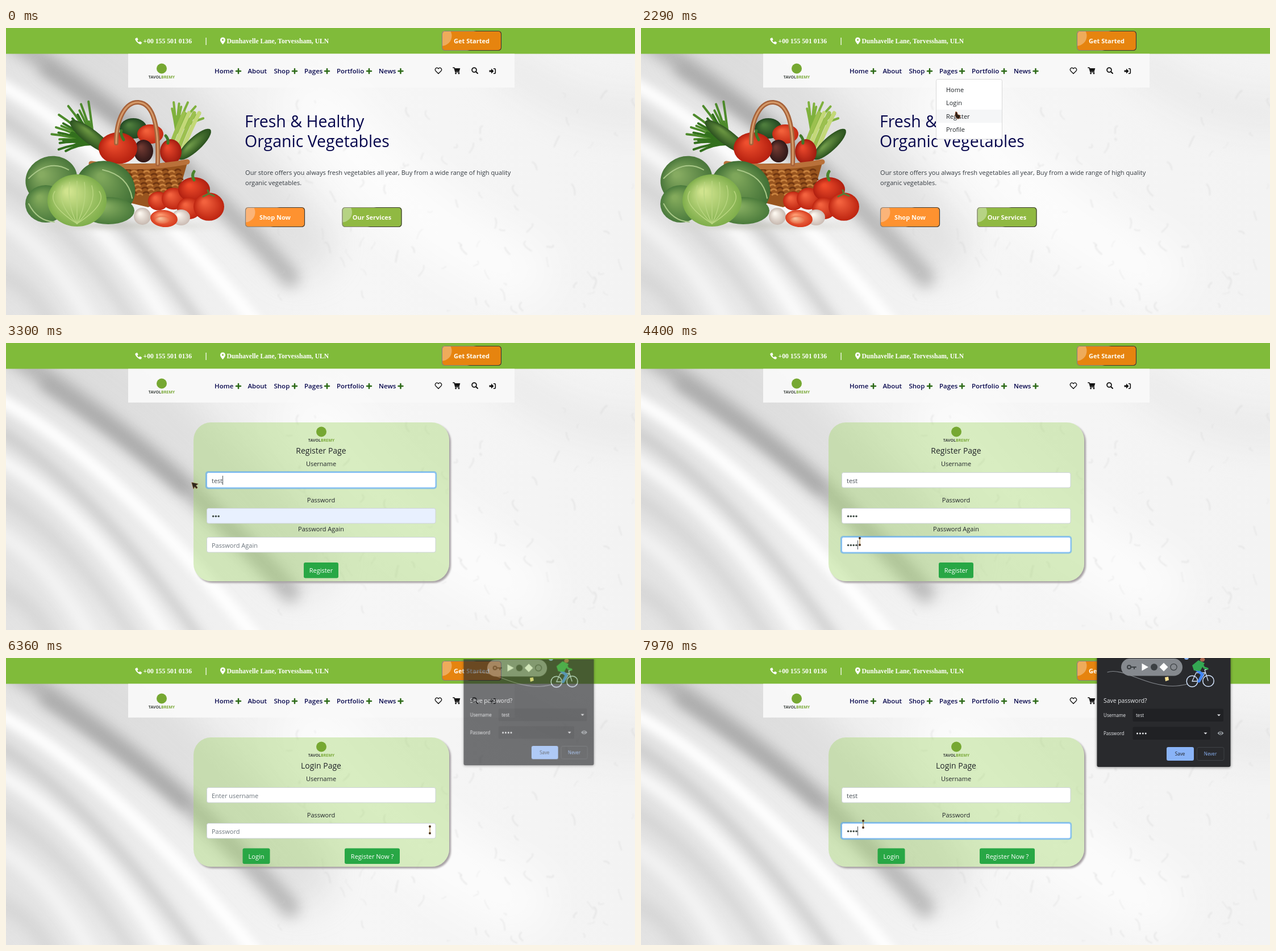
An HTML page with a canvas for the animation above (8 s loop, 1107x506 px).

```html
<!DOCTYPE html>
<html lang="en">
<head>
<meta charset="utf-8">
<title>Organic shop sign-up</title>
<style>
  html, body { margin: 0; width: 100%; height: 100%; overflow: hidden; background: #f4f4f4; }
  canvas { display: block; }
</style>
</head>
<body>
<canvas id="stage" width="1107" height="506"></canvas>
<script>
const W = 1107, H = 506, LOOP = 8000, TAU = Math.PI * 2;
const SANS = '"Open Sans", "Noto Sans", sans-serif';
const SERIF = '"Liberation Serif", serif';
const LOGIN_NAME = 'test';
const stage = document.getElementById('stage').getContext('2d');
let c = stage;

// --- helpers ---
function bake(draw) {
  const layer = document.createElement('canvas');
  layer.width = W;
  layer.height = H;
  c = layer.getContext('2d');
  draw();
  c = stage;
  return layer;
}

function text(str, x, y, size, color, weight = 400, align = 'left', family = SANS) {
  c.font = `${weight} ${size}px ${family}`;
  c.textAlign = align;
  c.fillStyle = color;
  c.fillText(str, x, y);
}

function box(x, y, w, h, r, fill, stroke, line = 1) {
  c.beginPath();
  c.roundRect(x, y, w, h, r);
  if (fill) { c.fillStyle = fill; c.fill(); }
  if (stroke) { c.strokeStyle = stroke; c.lineWidth = line; c.stroke(); }
}

function dot(x, y, r, fill) {
  c.beginPath();
  c.arc(x, y, r, 0, TAU);
  c.fillStyle = fill;
  c.fill();
}

function ring(x, y, r, color, line) {
  c.beginPath();
  c.arc(x, y, r, 0, TAU);
  c.strokeStyle = color;
  c.lineWidth = line;
  c.stroke();
}

function poly(fill, ...pts) {
  c.beginPath();
  for (let i = 0; i < pts.length; i += 2) c.lineTo(pts[i], pts[i + 1]);
  c.closePath();
  c.fillStyle = fill;
  c.fill();
}

function path(d, color, line) {
  const p = new Path2D(d);
  if (line) {
    c.strokeStyle = color;
    c.lineWidth = line;
    c.lineCap = c.lineJoin = 'round';
    c.stroke(p);
  } else {
    c.fillStyle = color;
    c.fill(p);
  }
}

function at(x, y, draw) {
  c.save();
  c.translate(x, y);
  draw();
  c.restore();
}

// --- cloth backdrop ---
function cloth() {
  const base = c.createLinearGradient(0, 0, W, 0);
  base.addColorStop(0, '#e3e3e3');
  base.addColorStop(0.3, '#efefef');
  base.addColorStop(0.55, '#f6f6f6');
  base.addColorStop(1, '#f3f3f3');
  c.fillStyle = base;
  c.fillRect(0, 0, W, H);

  const fold = (d, shade, alpha, width, blur) => {
    c.filter = `blur(${blur}px)`;
    path(d, `rgba(${shade},${shade},${shade},${alpha})`, width);
  };
  fold('M120 20 Q300 130 520 380', 205, 0.45, 110, 30);
  fold('M10 20 Q210 150 330 265 T500 440', 150, 0.6, 34, 12);
  fold('M70 75 Q200 160 310 255', 140, 0.4, 22, 10);
  fold('M-20 95 Q180 200 440 520', 255, 0.95, 24, 8);
  fold('M-20 150 Q150 250 340 520', 190, 0.6, 20, 9);
  fold('M-20 200 Q140 290 285 520', 255, 0.8, 22, 9);
  fold('M-20 265 Q110 340 225 520', 195, 0.5, 22, 11);
  fold('M-20 330 Q80 390 150 520', 255, 0.6, 24, 11);
  fold('M-20 430 Q40 450 80 520', 200, 0.5, 28, 12);
  fold('M880 60 Q1000 160 1130 150', 226, 0.5, 60, 28);
  fold('M540 130 Q700 340 900 430', 255, 0.7, 120, 40);

  // faint cracks
  let seed = 7;
  const rnd = () => (seed = seed * 16807 % 2147483647) / 2147483647;
  c.filter = 'blur(1.2px)';
  for (let i = 0; i < 90; i++) {
    const x = 480 + rnd() * 627, y = 110 + rnd() * 390;
    path(`M${x} ${y} q${rnd() * 16 - 8} ${rnd() * 9} ${rnd() * 22 - 11} ${rnd() * 20}`,
      'rgba(205,205,205,.3)', 1 + rnd() * 2);
  }
  c.filter = 'none';
}

// --- header ---
function shinyButton(x, y, label, fill, shine) {
  const w = 105, h = 35;
  box(x, y, w, h, 5, fill);
  c.save();
  c.clip();
  dot(x, y + 9, 17.5, shine);
  c.restore();
  const edge = c.createLinearGradient(x, y, x + w, y + h);
  edge.addColorStop(0, '#85807a');
  edge.addColorStop(0.48, '#85807a');
  edge.addColorStop(0.52, '#3c3a35');
  edge.addColorStop(1, '#3c3a35');
  box(x + 0.5, y + 0.5, w - 1, h - 1, 5, null, edge, 1.2);
  text(label, x + w / 2, y + 22, 11, '#fffdf5', 700, 'center');
}

function logo(x, y) {
  dot(x, y - 17, 9, '#76a832');
  c.font = `700 7px ${SANS}`;
  const left = x - c.measureText('TAVOLBREMY').width / 2;
  const mid = left + c.measureText('TAVOL').width;
  text('TAVOL', left, y, 7, '#3f4540', 700);
  text('BREMY', mid, y, 7, '#7ba93a', 700);
}

function header() {
  c.fillStyle = '#80bb3a';
  c.fillRect(0, 0, W, 45.5);
  at(227, 17, () => path('M1.2 1 L4 0 L5.6 3.5 L4 5.2 Q5 7.2 7 8.2 L8.7 6.6 L12 8.2 L11.2 11 Q9.8 12 7.5 11 Q1.8 8.2 .2 2.6 Z', '#fff'));
  text('+00 155 501 0136', 241.5, 27, 11.7, '#fff', 700, 'left', SERIF);
  c.fillStyle = '#fff';
  c.fillRect(351.5, 17, 1.2, 13);
  path('M381.5 29 C377 23.5 377 22.5 377 21 A4.5 4.5 0 0 1 386 21 C386 22.5 386 23.5 381.5 29 Z', '#fff');
  dot(381.5, 21, 1.6, '#80bb3a');
  text('Dunhavelle Lane, Torvessham, ULN', 388.5, 27, 11.6, '#fff', 700, 'left', SERIF);
  shinyButton(767, 5, 'Get Started', '#e6840f', '#eeab5b');

  c.fillStyle = 'rgba(249,249,249,.95)';
  c.fillRect(215, 45.5, 680, 59.5);
  logo(274, 88.5);
  const links = [['Home', 367, 409], ['About', 425.5], ['Shop', 471.5, 508], ['Pages', 525, 565],
    ['Portfolio', 582, 639], ['News', 656, 694.5]];
  for (const [label, x, plus] of links) {
    text(label, x, 80, 11.5, '#07074d', 600);
    if (plus) path(`M${plus - 4} 76 h8 M${plus} 72 v8`, '#2c6a17', 2.5);
  }
  path('M761 80.5 L756.3 75.8 C753.5 72.5 758 67.5 761 71.8 C764 67.5 768.5 72.5 765.7 75.8 Z', '#111', 1.3);
  at(786, 69, () => {
    path('M0.8 1 H3 L5 8.5 H11.5', '#111', 1.5);
    poly('#111', 3, 2, 13.3, 2, 11.8, 7.6, 4.4, 7.6);
    dot(5.6, 11, 1.4, '#111');
    dot(11, 11, 1.4, '#111');
  });
  ring(824, 74, 3.9, '#111', 1.8);
  path('M827 77 L830 80', '#111', 2);
  poly('#111', 850.5, 74.5, 854, 74.5, 854, 71.5, 858.5, 76, 854, 80.5, 854, 77.5, 850.5, 77.5);
  path('M858.5 71.8 H860 Q861.3 71.8 861.3 73 V79 Q861.3 80.2 860 80.2 H858.5', '#111', 1.6);
}

// --- produce basket in flat shapes ---
function blob(x, y, rx, ry, light, dark, turn = 0) {
  at(x, y, () => {
    c.rotate(turn);
    c.scale(rx, ry);
    const g = c.createRadialGradient(-0.3, -0.35, 0.1, 0, 0, 1);
    g.addColorStop(0, light);
    g.addColorStop(1, dark);
    dot(0, 0, 1, g);
  });
}

function sprig(x, y, reach, from, to, color) {
  for (let i = 0; i <= 14; i++) {
    const a = from + (to - from) * i / 14, r = reach * (0.75 + 0.25 * Math.sin(i * 2.3));
    path(`M${x} ${y} q${Math.cos(a) * r * 0.5} ${Math.sin(a) * r * 0.5 - 6} ${Math.cos(a) * r} ${Math.sin(a) * r}`, color, 4);
  }
}

function basket() {
  c.filter = 'blur(5px)';
  blob(220, 349, 155, 7, '#bcbcb4', 'rgba(220,220,215,.4)');
  c.filter = 'none';
  sprig(155, 205, 82, -3.0, -1.7, '#4d8a2b');
  sprig(150, 205, 62, -3.4, -2.0, '#33701d');
  blob(150, 192, 46, 13, '#67923f', '#2c5220', 0.65);
  sprig(300, 185, 58, -1.75, -0.5, '#7fb13d');
  for (let i = 0; i < 4; i++) path(`M${288 + i * 8} 212 Q${300 + i * 8} 180 ${313 + i * 9} 150`, i % 2 ? '#c3d878' : '#9cc04f', 7);
  blob(332, 205, 38, 12, '#6d9847', '#29501d', -0.75);
  blob(224, 177, 24, 18, '#4d7c3c', '#1f4520');
  blob(254, 187, 23, 17, '#f2603a', '#c42a14');
  blob(242, 217, 17, 20, '#713a32', '#2f1717');
  blob(197, 212, 34, 28, '#ef4f2e', '#b5200f');
  blob(290, 218, 19, 22, '#e9472b', '#9f1b0f');
  path('M207 197 q-6 -10 -4 -16 M285 203 q1 -8 -4 -13', '#3f7828', 5);
  poly('#99551f', 150, 240, 319, 238, 302, 298, 250, 316, 176, 298);
  for (let r = 0; r < 6; r++) {
    for (let i = 0; i < 13; i++) {
      const x = 166 + r * 2 + i * 11;
      path(`M${x} ${251 + r * 8 + (i % 2) * 3} q5 -4 9 0`, i % 2 ? '#c8823f' : '#703611', 3);
    }
  }
  path('M150 239 Q235 252 319 236', '#b9713a', 9);
  path('M194 203 C194 160 210 130 233 131 C262 133 269 180 267 240', '#a6623a', 8);
  path('M194 203 C194 160 210 130 233 131 C262 133 269 180 267 240', '#d59a69', 3);

  blob(80, 268, 46, 42, '#86ab61', '#49763a', -0.3);
  blob(175, 283, 53, 48, '#7ea65a', '#406f35', 0.4);
  blob(70, 310, 36, 33, '#83aa5b', '#4a7a3d');
  blob(180, 322, 46, 24, '#8ab163', '#4a7a3b');
  blob(125, 304, 52, 46, '#cfe38d', '#7fae4b');
  for (let i = -3; i <= 3; i++) path(`M125 345 Q${125 + i * 18} 310 ${125 + i * 13} ${270 + i * i * 2}`, '#b9d680', 1.4);
  path('M40 265 Q75 230 110 250 M170 250 Q215 260 222 300 M40 310 Q55 340 85 342', '#a9c888', 2);

  const tomato = (x, y, r) => blob(x, y, r, r * 0.92, '#f3623e', '#bd2410');
  tomato(268, 305, 18);
  tomato(295, 301, 21);
  blob(331, 285, 28, 22, '#ee4b2a', '#b01f10');
  path('M331 268 q-5 -8 0 -15', '#4a842c', 5);
  tomato(322, 318, 21);
  tomato(357, 315, 27);
  path('M347 297 l10 -5 l9 4 M357 292 l-2 -6', '#557f36', 3);
  blob(240, 332, 15, 15, '#fcf7ef', '#c7b9b0');
  blob(308, 334, 16, 14, '#fcf7ef', '#cbbbb3');
  blob(278, 336, 24, 15, '#ff9a70', '#d7391b', 0.1);
  blob(275, 338, 13, 7, '#f7c09a', '#e96a44');
}

// --- pages ---
function home() {
  cloth();
  header();
  basket();
  text('Fresh & Healthy', 420, 175, 28.5, '#07074d', 500);
  text('Organic Vegetables', 420, 210, 28.5, '#07074d', 500);
  text('Our store offers you always fresh vegetables all year, Buy from a wide range of high quality', 421, 259, 11.08, '#343a40');
  text('organic vegetables.', 421, 276.5, 11.08, '#343a40');
  shinyButton(421, 316, 'Shop Now', '#fe9230', '#fbb479');
  shinyButton(591.5, 316, 'Our Services', '#90b942', '#b6d384');
}

function form(title, height) {
  cloth();
  header();
  const card = new Path2D();
  card.roundRect(330, 140, 450, height, 31);
  c.save();
  const outside = new Path2D(card);
  outside.rect(0, 0, W, H);
  c.clip(outside, 'evenodd');
  c.filter = 'blur(1.5px)';
  at(3, 3, () => { c.fillStyle = '#a8a2a5'; c.fill(card); });
  c.restore();
  c.fillStyle = 'rgba(160,212,104,.4)';
  c.fill(card);
  logo(555, 173.5);
  text(title, 554.5, 195, 14, '#212529', 500, 'center');
  text('Username', 554.5, 217, 11, '#212529', 400, 'center');
  text('Password', 554.5, 280.5, 11, '#212529', 400, 'center');
}

function button(x, y, w, label, lit) {
  if (lit === 2) box(x - 2, y - 2, w + 4, 31.5, 5, 'rgba(72,180,97,.5)');
  box(x, y, w, 27.5, 3, lit ? '#218838' : '#28a745');
  text(label, x + w / 2, y + 18, 11, '#fff', 400, 'center');
}

const ROWS = { name: 228, pass: 291, again: 342 };

function field(row, hint, { value = '', dots = 0, focus, auto } = {}) {
  const y = ROWS[row];
  if (focus) box(350.8, y - 2, 407.4, 31.5, 5, 'rgba(80,165,255,.55)');
  box(353.5, y + 0.5, 402.5, 26.5, 3, auto ? '#e8f0fe' : '#fff', focus ? '#80bdff' : '#ced4da');
  let end = 362;
  if (dots) {
    for (let i = 0; i < dots; i++) dot(364.6 + i * 4.8, y + 14.5, 1.75, '#44504a');
    end += dots * 4.8;
  } else {
    text(value || hint, 362, y + 18.5, 11, value ? '#495057' : '#6c757d');
    if (value) end += c.measureText(value).width;
  }
  if (focus) {
    c.fillStyle = '#495057';
    c.fillRect(Math.round(end), y + 6, 1, 16);
  }
}

function menu(y) {
  box(519.5, 90.5, 116, 105.5, 3, '#fff', '#d9d9d9');
  ['Home', 'Login', 'Register', 'Profile'].forEach((label, i) => {
    const top = 97 + i * 23.4;
    if (y >= top && y < top + 23.4) {
      c.fillStyle = '#f5f6f7';
      c.fillRect(520, top, 115, 23.4);
    }
    text(label, 537, top + 16, 11, '#212529');
  });
}

// --- browser password bubble ---
function bubble() {
  c.save();
  c.shadowColor = 'rgba(0,0,0,.45)';
  c.shadowBlur = 5;
  c.shadowOffsetY = 1;
  box(802.5, -20, 235, 212, 3, '#292a2d');
  c.restore();
  path('M821 25 C840 18 870 36 900 44 S945 50 962 46', '#85898e', 1.1);
  box(845, 1, 108, 30.5, 15.3, '#85898e');
  ring(859, 16, 3, '#3c4043', 2);
  path('M862.5 16 H871 M868 16 v3', '#3c4043', 2);
  poly('#fff', 881.5, 9.5, 893, 16, 881.5, 22.5);
  dot(903, 16, 6, '#3c4043');
  poly('#fff', 920, 8.5, 927.5, 16, 920, 23.5, 912.5, 16);
  ring(937.5, 16, 5.6, '#3c4043', 1.2);
  poly('#fde293', 922, 34, 928, 33, 929, 39, 923, 41);
  dot(960, -1, 4, '#8ab4f8');
  ring(970, 41, 9.8, '#d2e3fc', 1.5);
  ring(998.5, 40.5, 9.8, '#d2e3fc', 1.5);
  path('M970 41 L977 26 L993 26 L984 41 Z M998 40 L992 21 L996 20', '#d2e3fc', 1.3);
  path('M977 20 L988 29 L982 41', '#4285f4', 5);
  poly('#34a853', 970, 13, 981, 4, 992, 9, 984, 23, 973, 22);
  path('M987 10 L991 17 L997 19', '#34a853', 3.5);
  dot(988, 2, 4.5, '#a8664f');
  path('M983 1 Q987 -5 993 0', '#202124', 3);

  const pale = '#e8eaed';
  text('Save password?', 814, 79, 10.4, pale);
  text('Username', 814, 103.5, 8.1, pale);
  text('Password', 814, 135.5, 8.1, pale);
  box(865.5, 89.5, 159.5, 22.5, 2, '#202124');
  box(865.5, 121.5, 136.5, 22.5, 2, '#202124');
  text(LOGIN_NAME, 871, 103.5, 8.1, pale);
  for (let i = 0; i < 4; i++) dot(873.5 + i * 4.9, 133, 1.5, pale);
  poly(pale, 1014, 99.5, 1020, 99.5, 1017, 102.5);
  poly(pale, 990.5, 131.5, 996.5, 131.5, 993.5, 134.5);
  path('M1014.5 132.5 Q1020 125.5 1025.5 132.5 Q1020 139.5 1014.5 132.5 Z', '#9aa0a6');
  dot(1020, 132.5, 2.4, '#292a2d');
  dot(1020, 132.5, 1.2, '#9aa0a6');
  box(925, 157, 48, 24, 3, '#8ab4f8');
  text('Save', 948.5, 171.8, 8.1, '#202124', 400, 'center');
  box(978.5, 157.5, 47.5, 23, 3, null, '#3f4246');
  text('Never', 1002, 171.8, 8.1, '#8ab4f8', 400, 'center');
}

function drawBubble(t) {
  if (t < 6270) return;
  const [alpha, scale] = t < 6360 ? [0.3, 0.95] : t < 6430 ? [0.65, 0.975] : t < 6510 ? [0.9, 0.992] : [1, 1];
  c.save();
  c.globalAlpha = alpha;
  c.translate(919.5, 76);
  c.scale(scale, scale);
  c.drawImage(layers.bubble, -919.5, -76);
  c.restore();
}

// --- pointer: [start, last step, steps, from x, y, to x, y] ---
const MOVES = [
  [70, 730, 10, 1050, 485, 545, 78],
  [1510, 2290, 11, 552, 93, 557, 153],
  [2760, 2920, 3, 450, 243, 327, 246],
  [3850, 4080, 4, 335, 258, 385, 300],
  [4230, 4230, 1, 385, 350, 385, 350],
  [4850, 5640, 11, 392, 345, 562, 402],
  [6190, 6360, 3, 602, 385, 746, 303],
  [6430, 6510, 2, 620, 296, 488, 286],
  [6660, 6910, 4, 455, 278, 356, 243],
  [7330, 7650, 5, 300, 245, 391, 293],
];

function pointerAt(t) {
  const move = MOVES.filter(m => m[0] <= t).pop();
  if (!move) return null;
  const [t0, t1, steps, x0, y0, x1, y1] = move;
  if (steps === 1) return { x: x0, y: y0 };
  const k = Math.min(steps - 1, Math.floor((t - t0) / (t1 - t0) * (steps - 1) + 1e-6)) / (steps - 1);
  const e = k * k * (3 - 2 * k);
  return { x: x0 + (x1 - x0) * e, y: y0 + (y1 - y0) * e };
}

const inside = (p, x, y, w, h) => p.x >= x && p.x <= x + w && p.y >= y && p.y <= y + h;

function pointer(p, shape) {
  at(p.x, p.y, () => {
    if (shape === 'text') {
      path('M0 -6 V6', '#b08a4a', 1.3);
      dot(0, -6, 2, '#4a3018');
      dot(0, 6, 2, '#4a3018');
    } else if (shape === 'hand') {
      const d = 'M-3 -5 L-1 -4 L0 0 L4 1 L4 5 L1 7 L-2 5 L-4 1 Z';
      path(d, '#a75b35', 1.5);
      path(d, '#2b2119');
    } else {
      const d = 'M0 0 L11 2.5 L7 5 L10 9 L8 10.5 L5 7 L3 11 Z';
      path(d, '#a9844d', 1.2);
      path(d, '#2f261d');
    }
  });
}

// --- timeline ---
const layers = {
  home: bake(home),
  register: bake(() => {
    form('Register Page', 280);
    text('Password Again', 554.5, 331.5, 11, '#212529', 400, 'center');
  }),
  login: bake(() => form('Login Page', 228)),
  bubble: bake(bubble),
};
const typed = (t, times) => times.filter(s => t >= s).length;

function render(t) {
  const p = pointerAt(t);
  let shape = 'arrow', fields = [];
  if (t < 2440) {
    c.drawImage(layers.home, 0, 0);
    if (t >= 1130) menu(p.y);
    if (p && (inside(p, 525, 66, 46, 23) || t >= 1130 && inside(p, 519, 97, 117, 94))) shape = 'hand';
  } else if (t < 6190) {
    c.drawImage(layers.register, 0, 0);
    fields = ['name', 'pass', 'again'];
    const over = inside(p, 524, 387, 61, 28);
    field('name', 'Enter username', {
      value: LOGIN_NAME.slice(0, typed(t, [2840, 2920, 3150, 3300])),
      focus: t >= 2760 && t < 4230,
    });
    field('pass', 'Password', { dots: t < 2760 ? 0 : t < 4230 ? 3 : 4, auto: t >= 2760 && t < 4230 });
    field('again', 'Password Again', {
      dots: t < 4230 ? 0 : t < 4400 ? 3 : 4,
      focus: t >= 4230 && t < 5640,
    });
    button(524, 387, 61, 'Register', t >= 5640 ? 2 : over ? 1 : 0);
    if (over) shape = 'hand';
  } else {
    c.drawImage(layers.login, 0, 0);
    fields = ['name', 'pass'];
    field('name', 'Enter username', {
      value: LOGIN_NAME.slice(0, typed(t, [6660, 6745, 6830, 6910])),
      focus: t >= 6510 && t < 7800,
    });
    field('pass', 'Password', {
      dots: t < 7800 ? 0 : t < 7885 ? 2 : t < 7970 ? 3 : 4,
      focus: t >= 7800,
    });
    button(416.5, 335.5, 48, 'Login');
    button(596, 335.5, 97, 'Register Now ?');
    drawBubble(t);
  }
  if (fields.some(f => inside(p, 353, ROWS[f], 403, 27))) shape = 'text';
  if (p) pointer(p, shape);
}

const start = performance.now();
function tick() {
  render((performance.now() - start) % LOOP);
  requestAnimationFrame(tick);
}
tick();
</script>
</body>
</html>
```
